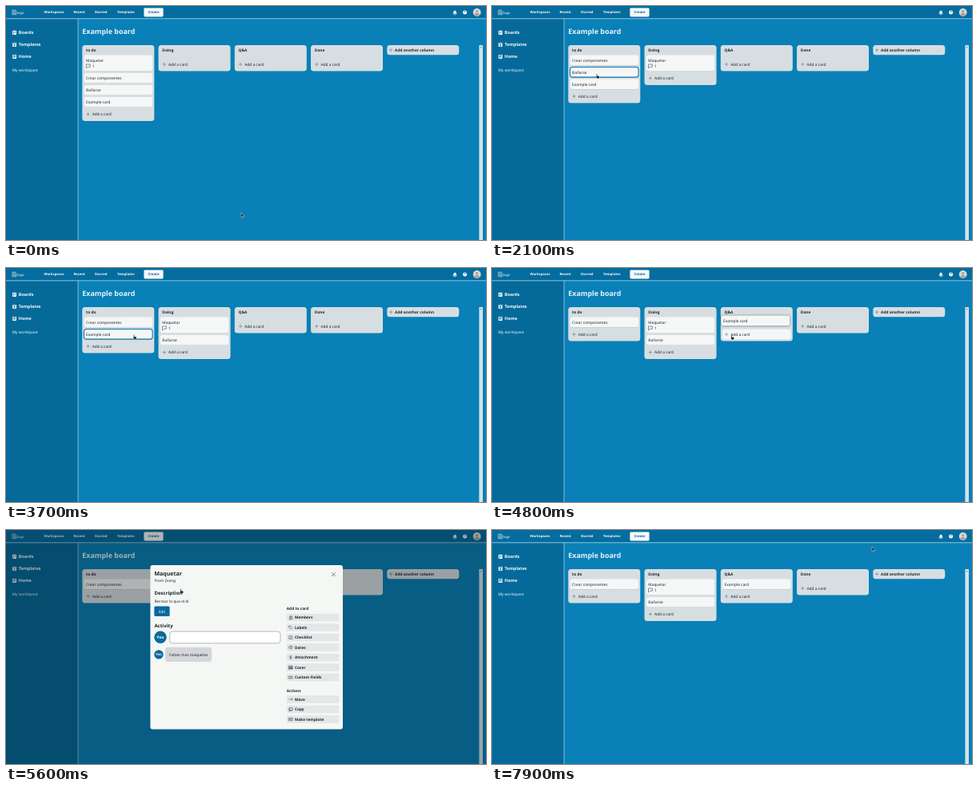
Write an HTML page that moves like this. It is 600x293 px and loops after 8000 ms.

```html
<!DOCTYPE html>
<html lang="en">
<head>
<meta charset="utf-8">
<title>Example board</title>
<style>
html, body { margin: 0; height: 100%; overflow: hidden; background: #0980b7; }
svg { display: block; width: 100vw; height: 100vh; }
text { font-family: "Noto Sans", "Open Sans", sans-serif; text-rendering: geometricPrecision; white-space: pre; }
.lifted { filter: drop-shadow(0 .8px .9px rgba(0, 20, 35, .55)); }
</style>
</head>
<body>
<svg id="stage" viewBox="0 0 600 293"></svg>
<script>
const LOOP = 8000;
const INK = '#1d262c';
const stage = document.getElementById('stage');

function el(tag, attrs, parent = stage) {
  const node = document.createElementNS('http://www.w3.org/2000/svg', tag);
  set(node, attrs);
  parent.appendChild(node);
  return node;
}
function set(node, attrs) {
  for (const key in attrs) node.setAttribute(key, attrs[key]);
}
const group = parent => el('g', {}, parent);
const box = (parent, x, y, width, height, fill, rx = 0, more = {}) =>
  el('rect', { x, y, width, height, fill, rx, ...more }, parent);
const disc = (parent, cx, cy, r, fill) => el('circle', { cx, cy, r, fill }, parent);
const line = (parent, d, stroke, width = 0.55, fill = 'none') =>
  el('path', { d, stroke, fill, 'stroke-width': width, 'stroke-linecap': 'round', 'stroke-linejoin': 'round' }, parent);
// Text is centred on the height of its capitals.
function text(parent, x, mid, str, { size = 4.8, bold = false, fill = INK, anchor = 'start' } = {}) {
  const node = el('text', { x, y: mid + size * 0.355, fill, 'font-size': size,
    'font-weight': bold ? 700 : 400, 'text-anchor': anchor }, parent);
  node.textContent = str;
  return node;
}
function plus(parent, x, y) {
  line(parent, `M${x - 1.9} ${y}h3.8M${x} ${y - 1.9}v3.8`, '#4b6b7c', 0.5);
}
const at = (x, y, parent) => el('g', { transform: `translate(${x} ${y})` }, parent);

// ---------- page ----------
const white = '#f4f9fb';
box(stage, 0, 0, 600, 293, '#0980b7');
box(stage, 0, 16, 90, 277, '#056a9a');
box(stage, 0, 0, 600, 15.6, '#056c9f');
box(stage, 0, 15.4, 600, 0.9, '#9ccbe0');
box(stage, 89.6, 16, 0.9, 277, '#8fc3db');

line(stage, 'M8.2 5h3.2l1.6 1.6v4.2h-4.8z', '#c9e0ea', 0.5, '#4f97bb');
line(stage, 'M8.6 10l1.5-1.8 1.3 1.2', '#9bd07a', 0.5);
text(stage, 13.9, 8.2, 'logo', { size: 4.2, fill: white });
[[47.5, 'Workspaces'], [84.5, 'Recent'], [111, 'Starred'], [139, 'Templates']]
  .forEach(([x, s]) => text(stage, x, 8, s, { size: 4.2, bold: true, fill: white }));
box(stage, 172.4, 2.4, 24.2, 11, white, 1.4);
text(stage, 184.5, 8, 'Create', { size: 4.2, bold: true, fill: '#0f5f8c', anchor: 'middle' });

line(stage, 'M558.9 9.6q.7-.7.7-2.2a1.5 1.5 0 0 1 3 0q0 1.500.7 2.200z', white, 0.4, white);
line(stage, 'M560.5 10.700h1.200', white, 0.7);
disc(stage, 573.6, 8, 2.5, white);
text(stage, 573.6, 8, '?', { size: 4, bold: true, fill: '#056c9f', anchor: 'middle' });
disc(stage, 588.7, 8, 4.9, '#d9d9d6');
disc(stage, 588.7, 6.7, 1.7, '#a3a5a5');
el('path', { d: 'M585.2 11.200q.5-2.400 3.500-2.400t3.500 2.400q-1.300 1.500-3.500 1.500t-3.500-1.500z', fill: '#a3a5a5' });

[[33.3, 'Boards'], [48.3, 'Templates'], [63.3, 'Home']].forEach(([y, s], i) => {
  box(stage, 8.1, y - 2.6, 4.9, 5.4, white, 0.8);
  line(stage, i ? `M9.4 ${y - 2.6}v1.300h2.300v-1.300M9.400 ${y + 0.8}h2.300${i > 1 ? 'v-1h-2.300z' : 'M10.550 ' + (y - 0.3) + 'v2.200'}`
    : `M9.600 ${y - 1.2}v2.700M11.500 ${y - 1.2}v1.300`, '#056a9a', 0.7);
  text(stage, 15.8, y, s, { size: 5.4, bold: true, fill: white });
});
text(stage, 7.7, 80.1, 'My workspace', { fill: white });
text(stage, 95.3, 32.1, 'Example board', { size: 8.9, bold: true, fill: '#e6f2f7' });

box(stage, 591.4, 49, 4.6, 244, '#d3e3ea');
el('path', { d: 'M592.700 52.200l1-1.500 1 1.500z', fill: '#56666e' });

// ---------- columns and cards ----------
const TOP = 49, LIST = 61.5;
const colX = i => 95.3 + 95.25 * i;
const columns = ['to do', 'Doing', 'Q&A', 'Done'].map((name, i) => {
  const x = colX(i);
  const body = box(stage, x, TOP, 90, 40, '#d7dee2', 3.5);
  text(stage, x + 4.8, 55.2, name, { bold: true });
  const add = group(stage);
  const glow = box(add, x + 2.2, -6.3, 85.6, 12.6, '#f4f7f7', 2.8);
  plus(add, x + 7.3, 0);
  text(add, x + 12.4, 0, 'Add a card');
  return { x, body, add, glow };
});
box(stage, colX(4), TOP, 90, 12.3, '#d7dee2', 3.5);
plus(stage, colX(4) + 4.8, 55.2);
text(stage, colX(4) + 9.8, 55.2, 'Add another column', { bold: true });

function makeCard(title, h = 12.6) {
  const g = group(stage);
  box(g, 0, 0.4, 85.6, h, '#bcc5ca', 2.8);
  const face = box(g, 0, 0, 85.6, h, '#f5f7f7', 2.8);
  text(g, 2.6, 6.5, title);
  return { g, face, h };
}
const cards = {
  comp: makeCard('Crear componentes'),
  maq: makeCard('Maquetar', 20.1),
  bath: makeCard('Bañarse'),
  ex: makeCard('Example card')
};
line(cards.maq.g, 'M3.100 11.500h4.500v3.300h-2.900l-1.600 1.400z', INK, 0.5);
text(cards.maq.g, 10.2, 13.7, '1');

// Slots of each list: card, time it opens, time it closes.
const slots = [
  [['maq', -999, 1300], ['comp'], ['bath', -999, 2400], ['ex', -999, 3850]],
  [['maq', 1300], ['bath', 2400], ['ex', 3850, 4200]],
  [['ex', 4250]],
  []
];
const drags = {
  maq: { grab: 500, drop: 1600, to: 1 },
  bath: { grab: 2200, drop: 2750, to: 1 },
  ex: { grab: 3800, drop: 4560, to: 2 }
};
const SETTLE = 500, FOLD = 120;
const OPEN = 5500, FOCUS = 6100, CLOSE = 7500;

// Pointer: time, x, y, hand (1) or arrow (0) from then on.
const path = [
  [0, 293.8, 259.5, 0], [100, 293.8, 259.5, 0], [300, 150, 72, 1], [500, 150, 72, 1],
  [1200, 200, 78, 1], [1600, 246, 76, 1], [1750, 235, 84, 1], [2050, 130.3, 84.8, 1],
  [2200, 130.3, 84.8, 1], [2750, 222, 96, 1], [3250, 190, 92, 0], [3650, 159.3, 83.2, 1],
  [3800, 159.3, 83.2, 1], [3900, 215, 90, 1], [4000, 254, 86, 1], [4300, 325, 68, 1],
  [4560, 344.3, 60.7, 1], [4780, 298.8, 83.8, 1], [4900, 298.8, 83.8, 1], [5150, 245, 88, 1],
  [5300, 217.8, 73.5, 1], [5700, 217.8, 73.5, 0], [5950, 232, 131, 0], [6100, 235, 133, 0],
  [6300, 235, 133, 0], [6650, 197.5, 94, 1], [6800, 197.5, 94, 0], [7100, 280, 111, 0],
  [7300, 408.5, 54, 1], [7500, 408.5, 54, 0], [7850, 475, 21.5, 0], [LOOP, 475, 21.5, 0]
];

// ---------- dialog ----------
const modal = group(stage);
box(modal, 0, 0, 600, 293, '#000', 0, { opacity: 0.28 });
box(modal, 180.4, 44, 240.6, 205.5, '#f5f7f5', 3);
text(modal, 185.4, 54.2, 'Maquetar', { size: 7, bold: true });
text(modal, 185.4, 63, 'From Doing');
text(modal, 185.4, 78.6, 'Description', { size: 6.1, bold: true });
text(modal, 185.4, 89.4, 'Recrear lo que el di');
box(modal, 185.3, 95.6, 19.3, 12.4, '#056a9d', 1.5);
text(modal, 195, 101.9, 'Edit', { fill: white, anchor: 'middle' });
text(modal, 185.4, 119.8, 'Activity', { size: 6.1, bold: true });
[[193, 134.3, 7.7, 5], [191, 155.9, 5.7, 4.2]].forEach(([x, y, r, size]) => {
  disc(modal, x, y, r, '#0a6a9b');
  text(modal, x, y, 'You', { size, bold: true, fill: white, anchor: 'middle' });
});
const input = box(modal, 204.7, 127, 138.3, 14.8, '#fff', 3.4);
const caret = box(modal, 208, 131.6, 0.5, 5.4, INK);
box(modal, 199, 146.8, 58.2, 18.2, '#d5d6da', 3);
text(modal, 204, 155.8, 'Faltan mas maquetas');
line(modal, 'M407.300 53.500l4.200 4.200M411.500 53.500l-4.200 4.200', '#333', 0.6);

const person = 'M-1.800 2q0-2 1.200-2t1.200 2zM-.6-.3a.8.8 0 1 1 .1 0M1 0q1.300 0 1.300 2h-.9M1-.4a.7.7 0 1 0-.2-1.300';
const menu = [
  [109.5, 'Members', person],
  [122, 'Labels', 'M-2-1.800h1.800l2.200 2.200-1.700 1.700-2.300-2.200zM-1.200-1h.1'],
  [134.5, 'Checklist', 'M2 0v1.900h-4v-3.800h3M-1-.2l.9.9 2.200-2.400'],
  [147, 'Dates', 'M-2.100 0a2.100 2.100 0 1 0 4.200 0a2.100 2.100 0 1 0-4.200 0M0-1.200v1.300h1'],
  [159.5, 'Attachment', 'M-1-1v2a1 1 0 0 0 2 0v-2.300a.7.7 0 0 0-1.400 0v2.200'],
  [172, 'Cover', 'M-2.200-1.800h4.400v3.600h-4.400zM-2 1.500l1.400-1.700 1 1 .7-.7 1 1.400z'],
  [184.5, 'Custom Fields', 'M-2.300-1.300h4.600v2.600h-4.600zM0-1.300v2.600'],
  [212, 'Move', 'M-2.200 0h4.400l-1.200-1.100M2.200 0l-1.200 1.100'],
  [224.5, 'Copy', 'M-1-2h3.200v3h-3.200zM-1-1h-1.200v3.200h3.200v-1.200'],
  [237, 'Make template', 'M-2.300-1.700h4.600v3.400h-4.600zM-1.400-.6h2.800M-1.400.5h1.500']
];
text(modal, 350.8, 98.1, 'Add to card', { bold: true });
text(modal, 350.8, 200.8, 'Actions', { bold: true });
menu.forEach(([y, name, icon]) => {
  box(modal, 350.8, y - 4.8, 65.4, 9.6, '#e4e6e7', 1.3);
  const d = line(at(355.9, y, modal), icon, '#333b40', 0.5);
  if (name === 'Cover') set(d, { fill: '#333b40', 'fill-opacity': 0.4 });
  text(modal, 360.9, y, name, { bold: true });
});

// ---------- pointer ----------
const pointer = group(stage);
const arrow = line(pointer, 'M0 0v5l1.200-1 .9 1.900.9-.4-.9-1.800h1.600z', '#e9f1f4', 0.45, '#10171b');
const hand = line(pointer, 'M.2.600q.5-.8 1 0v1.900l2 .5q.7.2.6.9l-.4 2h-2.200l-1.800-2.300q.2-.8.800-.2z', '#e9f1f4', 0.4, '#10171b');

// ---------- motion ----------
const ramp = (t, from, span) => Math.min(1, Math.max(0, (t - from) / span));

function pointerAt(t) {
  let i = path.length - 2;
  while (i > 0 && path[i][0] > t) i--;
  const [t0, x0, y0, kind] = path[i], [t1, x1, y1] = path[i + 1];
  const u = ramp(t, t0, t1 - t0);
  return { x: x0 + (x1 - x0) * u, y: y0 + (y1 - y0) * u, kind };
}

function layout(t) {
  return slots.map(list => {
    let y = LIST;
    const pos = {};
    for (const [id, opens = -999, closes = 1e9] of list) {
      pos[id] = y;
      y += (cards[id].h + 2.4) * ramp(t, opens, FOLD) * (1 - ramp(t, closes, FOLD));
    }
    return { pos, add: Math.max(y, LIST + 5) + 6.5 };
  });
}

const slotXY = (lists, col, id) => ({ x: colX(col) + 2.2, y: lists[col].pos[id] });

function carried(id, t) {
  const { grab } = drags[id];
  const home = slotXY(layout(grab), 0, id), a = pointerAt(grab), b = pointerAt(t);
  return { x: home.x + b.x - a.x, y: home.y + b.y - a.y };
}

function cardAt(id, t, lists) {
  const d = drags[id];
  if (!d || t < d.grab) return slotXY(lists, 0, id);
  if (t < d.drop) return { ...carried(id, t), lifted: true };
  const end = slotXY(lists, d.to, id);
  const left = (1 - ramp(t, d.drop, SETTLE)) ** 2;
  if (!left) return end;
  const start = carried(id, d.drop);
  return { x: end.x + (start.x - end.x) * left, y: end.y + (start.y - end.y) * left, lifted: true };
}

function render(t) {
  const lists = layout(t), p = pointerAt(t);
  const open = t >= OPEN && t < CLOSE;
  const busy = open || Object.values(drags).some(d => t >= d.grab && t < d.drop);
  const over = (x, y, h) => !busy && p.x >= x && p.x <= x + 85.6 && p.y >= y && p.y <= y + h;

  columns.forEach((c, i) => {
    const y = lists[i].add;
    set(c.body, { height: y + 8.5 - TOP });
    set(c.add, { transform: `translate(0 ${y})` });
    set(c.glow, { opacity: over(c.x + 2.2, y - 6.3, 12.6) ? 1 : 0 });
  });
  for (const id in cards) {
    const c = cards[id], at = cardAt(id, t, lists);
    const ring = !at.lifted && over(at.x, at.y, c.h);
    set(c.g, { transform: `translate(${at.x} ${at.y})`, class: at.lifted ? 'lifted' : '' });
    set(c.face, { stroke: ring ? '#0b74ad' : 'none', 'stroke-width': 1.1 });
  }

  set(modal, { display: open ? 'inline' : 'none' });
  const focus = t >= FOCUS;
  set(input, { stroke: focus ? '#2566b8' : '#9a9da0', 'stroke-width': focus ? 1.2 : 0.7 });
  set(caret, { opacity: focus && (t - FOCUS) % 1200 < 700 ? 1 : 0 });

  set(pointer, { transform: `translate(${p.x} ${p.y})` });
  set(arrow, { opacity: p.kind ? 0 : 1 });
  set(hand, { opacity: p.kind ? 1 : 0 });
}

const begin = performance.now();
function tick() {
  render((performance.now() - begin) % LOOP);
  requestAnimationFrame(tick);
}
tick();
</script>
</body>
</html>
```
